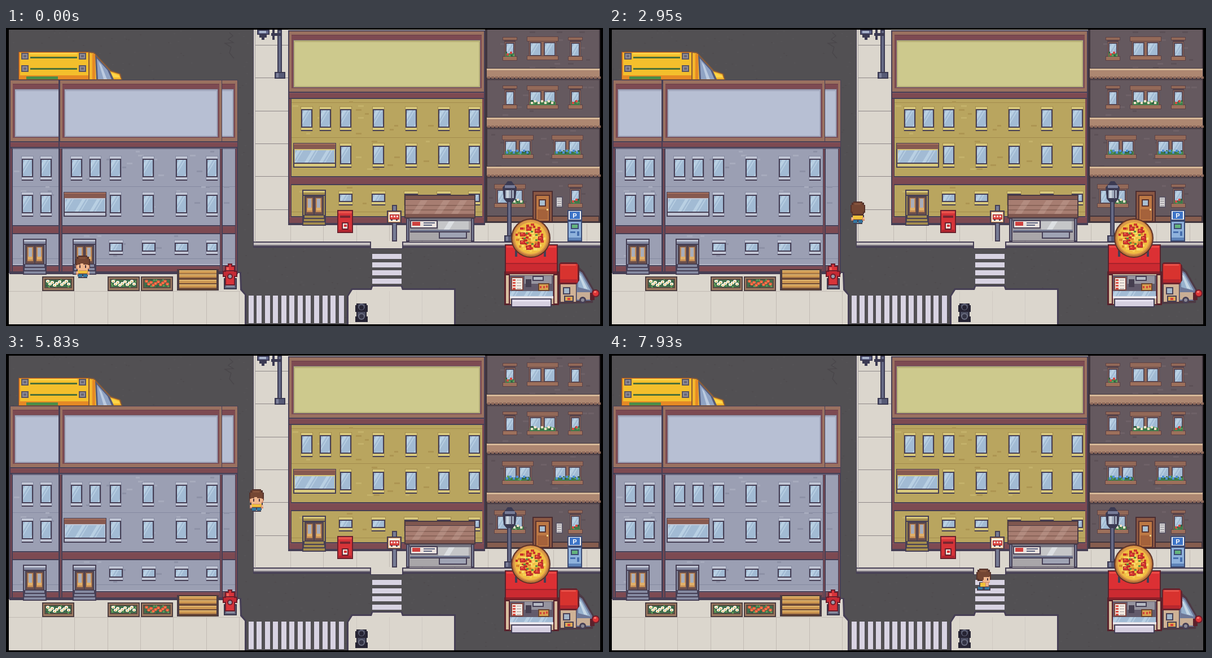
Recreate the animation shown at these times as an HTML page with a canvas. Size 1058x529 px, loop 7.99 s.

```html
<!DOCTYPE html>
<html lang="en">
<head>
<meta charset="utf-8">
<title>Street walk</title>
<style>
html, body { margin: 0; width: 100%; height: 100%; overflow: hidden; background: #000; }
canvas { display: block; }
</style>
</head>
<body>
<canvas id="stage" width="1058" height="529"></canvas>
<script>
const screen2d = document.getElementById('stage').getContext('2d');
const town = document.createElement('canvas');
town.width = 1058; town.height = 529;
let g = town.getContext('2d');

const INK = '#463f55', BROWN = '#9a7160', MAROON = '#7d4a52', ROAD = '#525053', PAVE = '#dbd6cd', SEAM = '#c2bbb4';

let seed = 7;
const rnd = () => (seed = (seed * 16807) % 2147483647) / 2147483647;
const rect = (c, x, y, w, h) => { g.fillStyle = c; g.fillRect(x, y, w, h); };
const box = (line, fill, x, y, w, h, b = 2) => { rect(line, x, y, w, h); rect(fill, x + b, y + b, w - 2 * b, h - 2 * b); };
const disc = (c, x, y, r) => { g.fillStyle = c; g.beginPath(); g.arc(x, y, r, 0, 7); g.fill(); };
const poly = (c, ...p) => {
  g.fillStyle = c; g.beginPath();
  for (let i = 0; i < p.length; i += 2) g.lineTo(p[i], p[i + 1]);
  g.fill();
};
const scatter = (n, colors, x, y, w, h, pw, ph) => {
  for (let i = 0; i < n; i++) rect(colors[i % colors.length], Math.round(x + rnd() * (w - pw)), Math.round(y + rnd() * (h - ph)), pw, ph);
};
const bricks = (n, colors, x, y, w, h) => {
  for (let i = 0; i < n; i++) rect(colors[i % colors.length], x + Math.floor(rnd() * (w - 14) / 4) * 4, y + Math.floor(rnd() * (h - 6) / 7) * 7, i % 3 ? 10 : 7, 3);
};

function glass(x, y, w, h) {
  g.save();
  g.beginPath(); g.rect(x, y, w, h); g.clip();
  rect('#a2bbd4', x, y, w, h);
  for (let i = x - 4; i < x + w + 20; i += 26) {
    poly('#b9d0e3', i + 8, y, i + 14, y, i + 14 - h * .6, y + h, i + 8 - h * .6, y + h);
    poly('#b9d0e3', i + 17, y, i + 19, y, i + 19 - h * .6, y + h, i + 17 - h * .6, y + h);
  }
  g.restore();
}

const BLUE = { wall: '#9b9fb3', dark: '#8d91a6', lite: '#a7abbd', cap: '#c1c6d5', line: '#858aa1', panel: '#b7bfd3', edge: '#a2a8bd' };
const GOLD = { wall: '#b9a55f', dark: '#ad9552', lite: '#c3b16a', cap: '#d8c87c', line: '#a38c4d', panel: '#cdc98d', edge: '#b7b077' };

function pane(x, y, p, w = 20, h = 44) {
  rect(p.line, x - 1, y, w + 2, h);
  rect(p.cap, x, y + 1, w, 4);
  rect(INK, x, y + 5, w, h - 10);
  glass(x + 2, y + 7, w - 4, h - 15);
  rect(p.cap, x, y + h - 6, w, 4);
  rect(INK, x, y + h - 2, w, 2);
}

function roof(x, y, w, h, p) {
  box(INK, BROWN, x, y, w, h, 1);
  rect(MAROON, x + 5, y + 7, w - 10, h - 14);
  rect('#6a3d48', x + 5, y + 7, w - 10, 1);
  rect('#73606f', x + 8, y + 16, w - 15, h - 24);
  rect(p.edge, x + 9, y + 17, w - 17, h - 26);
  rect(p.panel, x + 11, y + 20, w - 21, h - 31);
}

function band(x, y, w, h) {
  rect(INK, x, y, w, h);
  rect(MAROON, x + 1, y + 2, w - 2, h - 4);
  rect('#895760', x + 1, y + 2, w - 2, 1);
}

function billboard(x, y, p) {
  box(INK, p.cap, x, y, 76, 44);
  rect('#875a50', x + 1, y + 1, 74, 10);
  rect('#a5705d', x + 1, y + 1, 74, 2);
  glass(x + 3, y + 13, 70, 22);
  rect(INK, x + 2, y + 35, 72, 2);
}

function door(x, y, p) {
  box(INK, p.line, x, y, 42, 64);
  rect(p.cap, x + 2, y + 2, 38, 3);
  rect(INK, x + 1, y + 9, 40, 2);
  rect('#4c4350', x + 4, y + 11, 34, 34);
  for (const dx of [7, 23]) {
    rect('#6b4f4c', x + dx - 1, y + 13, 14, 31);
    rect('#c58d55', x + dx + 1, y + 15, 10, 25);
    rect('#a9aebb', x + dx + 3, y + 16, 6, 18);
    rect('#e0b06a', x + dx + 2, y + 32, 8, 5);
  }
  for (let i = 0; i < 3; i++) {
    rect(INK, x + 2 - i, y + 45 + i * 6, 38 + i * 2, 7);
    rect(p.line, x + 4 - i, y + 46 + i * 6, 34 + i * 2, 4);
  }
}

function flowers(x, y, w, colors) {
  rect('#3f7a4a', x, y + 3, w, 6);
  scatter(Math.round(w / 3), ['#2f5f42', '#5aa05b'], x, y, w, 9, 3, 3);
  for (let i = 2; i < w - 3; i += 6) rect(colors[i % colors.length], x + i, y + (i % 4 ? 3 : 0), 4, 4);
}

function framed(x, y, n, colors) {
  const w = n > 1 ? 56 : 26, h = 42;
  rect('#56444c', x + 3, y, w - 6, h);
  box('#5d4245', '#936958', x, y, w, n > 1 ? 9 : 6, 1);
  rect('#936958', x + 4, y + 9, w - 8, 26);
  for (let i = 0; i < n; i++) {
    const px = x + 6 + i * 25, pw = n > 1 ? 19 : 14;
    rect('#544755', px - 1, y + 10, pw + 2, 25);
    glass(px + 1, y + 12, pw - 2, 21);
  }
  box('#5d4245', '#9d705b', x, y + 34, w, 8, 1);
  if (colors) flowers(x + 5, y + 26, w - 10, colors);
}

function planter(x, colors) {
  box('#4d3f42', '#a07c62', x, 441, 57, 26);
  rect('#5c4a42', x + 4, 445, 49, 17);
  rect('#416f4b', x + 6, 447, 45, 13);
  scatter(24, ['#315f44', '#5f9d57'], x + 5, 446, 47, 15, 3, 3);
  for (let i = 0; i < 10; i++) {
    const fx = x + 7 + (i * 4.2 | 0), fy = 447 + (i * 5) % 8;
    rect(colors[0], fx, fy + 1, 6, 3);
    rect(colors[0], fx + 1, fy, 4, 5);
    rect(colors[1], fx + 2, fy + 2, 2, 2);
  }
}

function ground() {
  rect('#000', 0, 0, 1058, 529);
  rect(ROAD, 5, 3, 1048, 523);
  scatter(1200, ['#4f4c4f', '#555356'], 5, 3, 1048, 523, 3, 2);
  g.strokeStyle = '#4a474b'; g.lineWidth = 1.5; g.beginPath();
  for (const [x, y] of [[396, 8], [402, 14], [394, 20], [403, 26], [388, 27], [399, 34], [396, 44], [404, 54]]) g.lineTo(x, y);
  g.stroke();

  poly(INK, 5, 433, 417, 433, 418, 463, 426, 473, 426, 526, 5, 526);
  poly(PAVE, 5, 435, 414, 435, 415, 465, 423, 474, 423, 526, 5, 526);
  rect(SEAM, 5, 467, 411, 1);
  for (let x = 63; x < 420; x += 58.3) rect(SEAM, Math.round(x), 468, 1, 58);

  rect(INK, 438, 3, 615, 387);
  rect(PAVE, 439, 3, 614, 376);
  rect('#a9a4a6', 441, 3, 1, 377);
  rect('#c9c4c3', 439, 381, 614, 4);
  rect('#77727d', 439, 385, 614, 2);
  for (let y = 30; y < 370; y += 58.3) rect('#8e8888', 442, Math.round(y), 59, 1);
  for (let x = 504; x < 1050; x += 58.3) rect(SEAM, Math.round(x), 348, 1, 31);
  rect(INK, 645, 381, 59, 11);
  rect(PAVE, 647, 378, 55, 13);

  poly(INK, 604, 476, 612, 462, 646, 462, 648, 457, 702, 457, 704, 462, 797, 462, 797, 526, 604, 526);
  poly(PAVE, 607, 476, 614, 465, 648, 465, 650, 459, 700, 459, 702, 465, 794, 465, 794, 526, 607, 526);
  for (const x of [621, 679, 737]) rect('#d0cac3', x, 467, 1, 59);

  for (let i = 0; i < 12; i++) rect('#d8d3e2', Math.round(429.6 + i * 14.55), 475, 9, 49);
  for (let i = 0; i < 4; i++) rect('#d8d3e2', 649, Math.round(401 + i * 14.6), 52, 9);
}

function schoolVan() {
  box('#8a4d2d', '#e58a25', 22, 42, 126, 50, 1);
  rect('#f4bf2c', 25, 44, 121, 40);
  rect('#f9d348', 42, 44, 84, 3);
  for (const y of [51, 71]) rect('#4c7038', 43, y, 83, 3);
  for (const x of [27, 129]) for (const y of [44, 66]) {
    box('#5b5563', '#8f8d98', x, y, 13, 12);
    rect('#696675', x + 4, y + 4, 5, 4);
  }
  rect('#4b8d48', 36, 86, 56, 5);
  poly('#8a5a35', 146, 42, 156, 43, 186, 75, 203, 81, 206, 92, 146, 92);
  poly('#f4b52b', 148, 44, 155, 45, 185, 77, 201, 82, 204, 91, 148, 91);
  rect('#e58a25', 153, 46, 5, 45);
  poly('#565a78', 158, 48, 184, 76, 191, 91, 160, 91);
  poly('#8fa3c4', 161, 54, 180, 75, 187, 91, 163, 91);
  poly('#bccbe0', 164, 60, 169, 66, 179, 91, 173, 91);
  poly('#fdd549', 186, 79, 200, 84, 202, 88, 190, 88);
}

function blueBlock() {
  rect(INK, 6, 200, 405, 237);
  rect(BLUE.wall, 11, 212, 397, 218);
  for (const y of [281, 409]) rect(BLUE.line, 11, y, 397, 1);
  bricks(32, [BLUE.dark, BLUE.lite], 14, 218, 390, 128);
  bricks(10, [BLUE.dark, BLUE.lite], 14, 368, 390, 50);
  roof(7, 92, 100, 110, BLUE);
  roof(323, 92, 88, 110, BLUE);
  roof(95, 92, 288, 110, BLUE);
  rect('#6b6880', 11, 213, 397, 2);
  band(7, 201, 404, 12);
  band(7, 350, 404, 16);
  band(7, 421, 404, 13);
  rect('#b3b7c7', 11, 419, 396, 2);
  for (const x of [7, 95, 379, 406]) {
    rect(INK, x, 214, 5, 220);
    rect(MAROON, x + 1, 214, 2, 218);
  }
  rect(INK, 93, 92, 2, 344);
  for (const x of [28, 61, 115, 148, 184, 242, 301, 355]) {
    pane(x, 227, BLUE);
    if (x < 100 || x > 180) pane(x, 291, BLUE);
  }
  billboard(102, 291, BLUE);
  for (const x of [183, 241, 299]) pane(x, 376, BLUE, 24, 27);
  pane(355, 376, BLUE, 20, 27);
  door(30, 374, BLUE);
  door(118, 374, BLUE);
}

function goldBlock() {
  rect(INK, 500, 4, 349, 346);
  rect(GOLD.wall, 506, 124, 338, 214);
  for (const y of [132, 194, 326]) rect(GOLD.line, 506, y, 338, 1);
  bricks(26, [GOLD.dark, GOLD.lite], 508, 130, 332, 130);
  bricks(8, [GOLD.dark, GOLD.lite], 508, 282, 332, 48);
  roof(501, 5, 347, 109, GOLD);
  band(501, 113, 347, 13);
  band(501, 263, 347, 16);
  band(501, 334, 347, 14);
  for (const x of [501, 843]) rect(MAROON, x + 1, 126, 3, 210);
  for (const x of [523, 556, 592, 650, 708, 766, 820]) {
    pane(x, 139, GOLD);
    if (x > 580) pane(x, 204, GOLD);
  }
  billboard(509, 204, GOLD);
  for (const x of [590, 648, 706, 764]) pane(x, 289, GOLD, 24, 26);
  pane(820, 289, GOLD, 20, 26);
  door(525, 287, GOLD);
}

function brownBlock() {
  rect('#40353d', 849, 3, 204, 343);
  rect('#65595f', 853, 3, 198, 333);
  bricks(50, ['#5d5157', '#6e6167'], 856, 6, 192, 328);
  for (const y of [71, 158, 245]) {
    rect('#40353d', 851, y, 202, 20);
    rect('#ad8771', 852, y + 1, 200, 16);
    rect('#d6b898', 852, y + 1, 200, 3);
    for (let x = 853; x < 1050; x += 7) rect('#8d695b', x, y + 15, 5, 4);
    rect('#54474e', 853, y + 20, 198, 2);
  }
  const red = ['#d84a45', '#f0e6d8'], pink = ['#f2dfc8', '#e89a78'], blue = ['#4f8fd8', '#8cc0ea'];
  framed(880, 16, 1, red); framed(923, 15, 2); framed(996, 16, 1);
  framed(880, 102, 1); framed(923, 102, 2, pink); framed(996, 102, 1, ['#d84a45']);
  framed(879, 190, 2, blue); framed(967, 190, 2, blue);
  framed(865, 277, 2); flowers(897, 303, 20, pink);
  framed(996, 277, 1, red);
  box('#40353d', '#865d4e', 851, 333, 201, 12);
  box('#4a2d31', '#8b5743', 933, 289, 36, 56);
  box('#5a3430', '#bd7844', 938, 296, 26, 48);
  box('#5a3430', '#a9bfd2', 944, 304, 13, 13);
  rect('#a5623b', 942, 322, 18, 18);
  rect('#f1d287', 958, 321, 3, 3);
  box('#5b5563', '#d5d3d5', 974, 299, 13, 20);
  for (let y = 303; y < 316; y += 4) rect('#8d8991', 977, y, 7, 1);
}

function lampPost(x, top, bottom) {
  box('#3b3a52', '#666a86', x - 4, top, 8, bottom - top);
  box('#3b3a52', '#565a76', x - 9, bottom - 12, 19, 12);
  rect('#7d819b', x - 6, bottom - 10, 4, 8);
}

function shelter() {
  box(INK, '#a9a6a9', 709, 337, 121, 41, 1);
  rect('#74737f', 713, 338, 113, 5);
  rect('#c5c6c8', 766, 343, 54, 16);
  poly('#dcdfe2', 785, 343, 795, 343, 785, 359, 775, 359);
  box(INK, '#eae2de', 716, 341, 49, 15);
  rect('#cf403e', 720, 344, 14, 7); rect('#5c6380', 740, 345, 20, 2); rect('#5c6380', 740, 349, 15, 2);
  rect('#747a92', 716, 358, 106, 3); rect(INK, 716, 361, 106, 2);
  box(INK, '#9fa3b4', 767, 361, 50, 13);
  for (const x of [709, 824]) box(INK, '#7c8199', x, 337, 6, 42);
  box('#4a3b44', '#a77d71', 706, 296, 126, 42);
  rect('#7f574f', 708, 298, 122, 6);
  rect('#4a3b44', 708, 304, 122, 1);
  for (const y of [314, 322]) rect('#8b655a', 708, y, 122, 2);
  rect('#7f574f', 708, 330, 122, 6);
  g.globalAlpha = .25;
  for (const x of [735, 775, 805]) poly('#d8bbb0', x, 306, x + 12, 306, x - 4, 330, x - 16, 330);
  g.globalAlpha = 1;
}

function furniture() {
  lampPost(485, 3, 90);
  rect('#3b3a52', 470, 9, 19, 5);
  rect('#3b3a52', 472, 3, 4, 18);
  box('#3b3a52', '#60658a', 445, 3, 22, 9);
  rect('#a9b4cc', 449, 5, 12, 4);
  rect('#3b3a52', 449, 12, 13, 5); rect('#3b3a52', 453, 17, 5, 4);

  box('#69212d', '#d63338', 587, 323, 28, 41);
  rect('#e9524c', 589, 325, 24, 4);
  rect('#7a2630', 592, 333, 18, 4);
  rect('#b3252f', 590, 358, 22, 4);
  box('#69212d', '#ece3db', 595, 345, 12, 13);
  rect('#d63338', 599, 349, 5, 4);

  box(INK, '#777c95', 684, 314, 9, 65);
  box(INK, '#f1e0c5', 675, 324, 26, 23);
  box('#c47f44', '#f5ebda', 677, 326, 22, 19, 1);
  box('#a3292f', '#dd4640', 680, 331, 17, 9, 1);
  for (const x of [682, 687, 692]) rect('#f4dede', x, 333, 3, 3);
  rect(INK, 682, 340, 3, 2); rect(INK, 691, 340, 3, 2);

  shelter();

  lampPost(892, 300, 380);
  poly('#3b3a52', 886, 276, 889, 272, 896, 272, 899, 276, 905, 283, 903, 303, 898, 309, 887, 309, 882, 303, 880, 283);
  rect('#777c98', 884, 279, 18, 5);
  rect('#a3aebf', 885, 288, 15, 14);
  rect('#ccd5df', 887, 288, 4, 14); rect('#53536a', 895, 287, 2, 16);

  box('#3c4a72', '#8fb2dc', 995, 342, 26, 37);
  box('#3c4a72', '#f2f3f5', 995, 323, 26, 19);
  rect('#3d74c8', 999, 326, 18, 13);
  g.fillStyle = '#fff'; g.font = 'bold 11px "Liberation Sans", sans-serif'; g.textAlign = 'center';
  g.fillText('P', 1008, 336.5);
  box('#3c4a72', '#63b37c', 1001, 347, 14, 10);
  rect('#476fae', 1000, 361, 9, 3); rect('#476fae', 1012, 361, 4, 8); rect('#5e83b8', 997, 372, 22, 5);

  planter(64, ['#f2eee4', '#e2bd55']);
  planter(180, ['#f2eee4', '#e2bd55']);
  planter(239, ['#e4583f', '#f39a55']);

  box('#4a3835', '#6f4b38', 303, 428, 74, 38);
  for (const y of [430, 437, 447, 455]) {
    rect('#cb9550', 307, y, 66, 6);
    rect('#e2b76e', 307, y, 66, 2);
  }
  for (const x of [303, 373]) rect('#4a3c44', x, 428, 4, 38);

  box('#3a374a', '#60647b', 386, 444, 23, 20);
  rect('#8b8fa1', 390, 457, 15, 3);
  rect('#6c1d2b', 384, 431, 26, 11);
  rect('#6c1d2b', 388, 422, 18, 35); rect('#6c1d2b', 393, 418, 8, 6);
  rect('#d8343a', 390, 424, 14, 31); rect('#d8343a', 395, 420, 4, 4); rect('#c42a34', 386, 433, 22, 7);
  rect('#ee655c', 391, 425, 4, 6); rect('#6c1d2b', 387, 430, 20, 2);
  disc('#6c1d2b', 397, 441, 5); disc('#9a9dab', 397, 441, 3);

  box('#262433', '#4a4c60', 621, 489, 18, 33);
  rect('#262433', 619, 492, 22, 12); rect('#262433', 619, 512, 22, 10);
  disc('#5d6075', 630, 495, 6); disc('#262433', 630, 496, 4);
  disc('#6a6d80', 630, 512, 6); disc('#343445', 630, 512, 4);
}

function pizzaTruck() {
  box('#5a222c', '#c9b29a', 883, 432, 97, 60);
  box('#5a222c', '#dc3034', 884, 384, 94, 53);
  rect('#ea4a46', 887, 387, 88, 3);
  rect('#a8232b', 886, 417, 90, 2);
  rect('#cb2a31', 886, 419, 90, 13);
  rect('#8c2029', 886, 432, 90, 4);
  rect('#625a6b', 892, 439, 78, 38);
  rect('#96949f', 919, 440, 48, 14);
  box(INK, '#b7bbc5', 933, 440, 20, 9); rect('#463f50', 921, 446, 10, 14);
  box('#7d4540', '#f3eae1', 895, 442, 22, 24);
  for (let i = 0; i < 4; i++) {
    rect('#d84b40', 898, 446 + i * 5, 5, 3);
    rect('#a39a9c', 905, 447 + i * 5, 8, 1);
  }
  glass(893, 467, 76, 9);
  box('#6a4430', '#d8a250', 943, 453, 20, 14);
  for (const x of [946, 952, 957]) rect('#d3453a', x, 457 + x % 3, 3, 4);
  rect('#e6e4ea', 892, 476, 78, 4);
  box('#454057', '#d5cfe0', 895, 480, 72, 16);
  rect('#e3deed', 898, 483, 66, 3);
  for (const x of [884, 970]) box('#5a222c', '#d9bea0', x, 437, 9, 54);

  poly('#4d3a45', 980, 450, 1013, 422, 1024, 432, 1042, 464, 1040, 488, 980, 490);
  rect('#cfb296', 983, 455, 27, 31);
  poly('#6e7898', 1011, 428, 1021, 434, 1039, 465, 1036, 484, 1011, 484);
  poly('#97b1cd', 1014, 432, 1020, 437, 1036, 466, 1014, 460);
  poly('#c6d7e5', 1015, 438, 1019, 440, 1031, 464, 1024, 462);
  rect('#c9ae95', 1012, 469, 23, 13);
  poly('#69222c', 980, 419, 983, 416, 1011, 416, 1016, 422, 1016, 448, 1011, 455, 980, 455);
  rect('#d8332f', 982, 419, 31, 33);
  rect('#e95149', 984, 419, 26, 3); rect('#b7272e', 982, 446, 30, 6);
  box(INK, '#a3b5c8', 987, 460, 13, 13);
  box(INK, '#dca957', 989, 475, 17, 11);
  rect('#d8413a', 995, 479, 5, 4);
  disc(INK, 1022, 483, 6); disc('#8d8a96', 1022, 483, 3);
  rect('#5a222c', 1035, 470, 8, 13);
  disc('#6c1d2b', 1045, 471, 7); disc('#de3537', 1045, 471, 5); rect('#f4766a', 1042, 467, 4, 3);

  for (const x of [902, 953]) rect(INK, x, 395, 4, 11);
  disc('#5d3229', 930, 373, 35);
  disc('#bd7639', 930, 373, 33);
  disc('#dc9a48', 930, 372, 31);
  disc('#f1bd42', 930, 373, 28);
  for (let i = 0; i < 60; i++) {
    const a = i * 2.4, r = 3.2 * Math.sqrt(i);
    rect(['#f9db6a', '#d9822f', '#cf3c2d', '#f6cf55', '#c93029'][i % 5], Math.round(927 + r * Math.cos(a)), Math.round(371 + r * Math.sin(a)), 6 - i % 3, 4);
  }
  for (let i = 0; i < 7; i++) {
    const a = i * Math.PI / 3.5, x = Math.round(926 + 17 * Math.cos(a)), y = Math.round(370 + 17 * Math.sin(a));
    box('#a52a2b', '#d9362f', x, y, 9, 7, 1);
    rect('#ee7452', x + 2, y + 1, 3, 2);
    rect('#5a8f3c', Math.round(928 + 11 * Math.cos(a + .4)), Math.round(371 + 11 * Math.sin(a + .4)), 4, 3);
  }
}

ground();
schoolVan();
blueBlock();
goldBlock();
brownBlock();
furniture();
pizzaTruck();

// Walking route: step, centre x, top y
const ROUTE = [
  [0, 135.5, 404], [4, 135.5, 446], [5, 135.5, 450], [5.3, 135.5, 450], [34.15, 440.5, 450], [34.6, 440.5, 450],
  [73, 440.5, 44], [73.5, 440.5, 38], [75, 422, 38], [77, 444, 39], [109.5, 444, 383], [110.15, 444, 383], [132, 675, 383]
];

function locate(n) {
  let face = 'down';
  for (let i = 1; i < ROUTE.length; i++) {
    const [n0, x0, y0] = ROUTE[i - 1], [n1, x1, y1] = ROUTE[i];
    const dx = x1 - x0, dy = y1 - y0;
    if (dx || dy) face = Math.abs(dx) > Math.abs(dy) ? (dx > 0 ? 'right' : 'left') : (dy > 0 ? 'down' : 'up');
    if (n < n1) {
      const k = (n - n0) / (n1 - n0);
      return { x: x0 + dx * k, y: y0 + dy * k, face };
    }
  }
}

const HAIR = '#744633', HAIR_DARK = '#54332c', HAIR_LIGHT = '#85533c', SKIN = '#f0b78f', SKIN_DARK = '#cc8768';
const SHIRT = '#f1c23b', JEANS = '#35769f', LINE = '#46404f';

function hair() {
  rect(HAIR_DARK, -8, 0, 16, 3);
  rect(HAIR_DARK, -11, 2, 22, 20);
  rect(HAIR_DARK, -13, 6, 26, 14);
  rect(HAIR, -8, 2, 16, 18);
  rect(HAIR, -11, 6, 22, 12);
  rect(HAIR_LIGHT, -6, 3, 11, 3);
}

function walkFront(back, swing) {
  const s = back ? -swing : swing;
  rect(LINE, -9, 32, 18, 5);
  rect(JEANS, -8, 32, 7, s < 0 ? 5 : 7);
  rect(JEANS, 1, 32, 7, s > 0 ? 5 : 7);
  rect(LINE, s < 0 ? 1 : -8, 38, s ? 7 : 16, 2);
  rect(LINE, -11, 24, 22, 9);
  rect(SHIRT, -9, 25, 18, 7);
  rect('#d99c34', -9, 31, 18, 1);
  for (const d of [-1, 1]) {
    const out = d === s ? 3 : 0;
    rect(SKIN_DARK, d * (10 + out) - 2, 28 - out, 4, 6);
    rect(SKIN, d * (10 + out) - 1, 28 - out, 3, 4);
  }
  hair();
  if (back) {
    rect(HAIR_DARK, -10, 20, 20, 5);
    rect(HAIR, -9, 18, 18, 4);
    return;
  }
  rect(SKIN_DARK, -12, 17, 24, 7);
  rect(SKIN, -11, 17, 22, 5);
  rect(SKIN, -9, 14, 18, 12);
  rect(HAIR, -9, 13, 5, 3); rect(HAIR, 1, 13, 8, 3);
  for (const x of [-6, 4]) rect('#4a3340', x, 17, 2, 5);
  rect(SKIN_DARK, -7, 26, 14, 1);
}

function walkSide(swing) {
  if (swing) {
    rect(LINE, -12, 32, 24, 7);
    rect(JEANS, -10, 32, 8, 5); rect(JEANS, 2, 32, 8, 5);
  } else {
    rect(LINE, -7, 32, 14, 8);
    rect(JEANS, -6, 32, 12, 6);
  }
  rect(LINE, -8, 24, 17, 9);
  rect(SHIRT, -6, 25, 14, 7);
  const a = swing * 6;
  rect(SKIN_DARK, a - 3, 25, 6, 7); rect(SKIN, a - 2, 25, 4, 6);
  hair();
  rect(SKIN_DARK, -2, 15, 13, 10);
  rect(SKIN, -1, 14, 12, 10);
  rect(HAIR, -1, 12, 11, 3); rect(HAIR, -3, 14, 3, 6);
  rect('#4a3340', 6, 17, 2, 4);
}

const start = performance.now(), LOOP = 7990;

function draw() {
  const t = (performance.now() - start) % LOOP;
  const n = t < 130 ? 0 : Math.floor((t - 130) / 60) + 1;
  const { x, y, face } = locate(n);
  const swing = n % 6 === 2 ? -1 : n % 6 === 5 ? 1 : 0;
  const side = face === 'left' || face === 'right';
  g = screen2d;
  g.drawImage(town, 0, 0);
  g.save();
  g.translate(Math.round(x), Math.round(y) - (side && swing ? 2 : 0));
  if (face === 'left') g.scale(-1, 1);
  if (side) walkSide(swing); else walkFront(face === 'up', swing);
  g.restore();
  requestAnimationFrame(draw);
}
draw();
</script>
</body>
</html>
```
